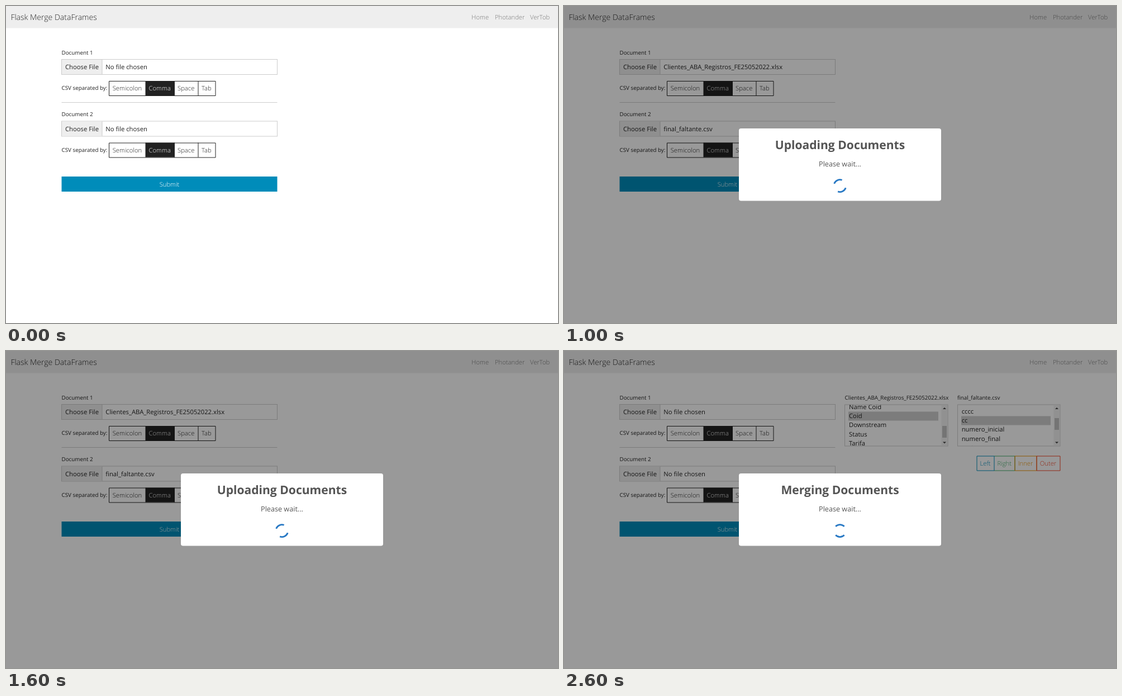
Animation, 988 px wide and 567 px high, one loop 3 s. Source, as an HTML page:

```html
<!DOCTYPE html>
<html lang="en">
<head>
<meta charset="utf-8">
<title>Flask Merge DataFrames</title>
<style>
  html, body { margin: 0; width: 100%; height: 100%; overflow: hidden; background: #fff; }
  svg { display: block; width: 988px; height: 567px; font: 400 11.25px "Open Sans", sans-serif; text-rendering: geometricPrecision; }
  text { fill: #222; }
  .light { font-weight: 300; }
  .label { font-size: 9.84px; }
  .brand { font-size: 14.06px; }
  .link { fill: #777; }
  .white { fill: #fff; }
  .mid { text-anchor: middle; }
  .title { font-size: 21.09px; font-weight: 700; fill: #545454; }
  .note { font-size: 12.656px; fill: #545454; }
  .field { fill: #fff; stroke: #ccc; }
  .box { fill: none; stroke: #222; }
  .spin { fill: none; stroke: #2778c4; stroke-width: 2.8; }

  /* idle -> uploading -> merging */
  .idle, .upload, .merge, .busy, .empty { animation: 3s step-end infinite; }
  .idle { animation-name: idle; }
  .upload { animation-name: upload; }
  .merge { animation-name: merge; }
  .busy { animation-name: busy; }
  .empty { animation-name: empty; }
  @keyframes upload { 0%, 66.6666%, 100% { visibility: hidden; } 33.3333% { visibility: visible; } }
  @keyframes merge { 0%, 33.3333% { visibility: hidden; } 66.6666%, 100% { visibility: visible; } }
  @keyframes busy { 0% { visibility: hidden; } 33.3333%, 100% { visibility: visible; } }
  @keyframes empty { 0%, 66.6666%, 100% { visibility: visible; } 33.3333% { visibility: hidden; } }
</style>
</head>
<body>
<svg viewBox="0 0 988 567">
  <defs>
    <g id="form">
      <rect class="field" x="99.5" y="95.5" width="386" height="27"/>
      <path d="M100 96h72v26h-72z" fill="#eee"/>
      <path d="M172 96v26" stroke="#ccc"/>
      <text x="106" y="113">Choose File</text>
      <text class="label" x="99.5" y="150">CSV separated by:</text>
      <path d="M250 134h52v26h-52z" fill="#222"/>
      <path class="box" d="M184.5 134.5h190.5v26h-190.5zM250 134v26M301.5 134v26M344 134v26"/>
      <g class="light">
        <text x="190.7" y="151">Semicolon</text>
        <text class="white" x="255.5" y="151">Comma</text>
        <text x="307" y="151">Space</text>
        <text x="350" y="151">Tab</text>
      </g>
    </g>
    <g id="bar">
      <path d="M0 0h11v73h-11z" fill="#f1f1f1"/>
      <path d="M2.5 7.5l3-3 3 3zM2.5 66l3 3 3-3z" fill="#444"/>
    </g>
    <path id="arcs" class="spin" d="M-7.76-7.76A10.975 10.975 0 0 1 7.76-7.76M7.76 7.76A10.975 10.975 0 0 1-7.76 7.76"/>
    <clipPath id="list1"><path d="M503 96.5h173v73h-173z"/></clipPath>
    <clipPath id="list2"><path d="M705 96.5h172v73h-172z"/></clipPath>
  </defs>

  <path d="M0 0h988v39.5h-988z" fill="#eee"/>
  <g class="light">
    <text class="brand" x="8.4" y="25">Flask Merge DataFrames</text>
    <text class="link" x="833.3" y="24">Home</text>
    <text class="link" x="875" y="24">Photander</text>
    <text class="link" x="938" y="24">VerTob</text>
  </g>

  <text class="label" x="99.5" y="86.5">Document 1</text>
  <use href="#form"/>
  <path d="M99.5 172.5h386" stroke="#ccc"/>
  <text class="label" x="99.5" y="197">Document 2</text>
  <use href="#form" y="110.5"/>
  <path d="M99.5 305h386v27h-386z" fill="#008cba"/>
  <text class="light white mid" x="292.5" y="322.5">Submit</text>

  <g class="empty">
    <text x="178.3" y="113">No file chosen</text>
    <text x="178.3" y="223.5">No file chosen</text>
  </g>
  <g class="upload">
    <text x="178.3" y="113">Clientes_ABA_Registros_FE25052022.xlsx</text>
    <text x="178.3" y="223.5">final_faltante.csv</text>
  </g>

  <g class="merge">
    <text class="label" x="502.5" y="86.5">Clientes_ABA_Registros_FE25052022.xlsx</text>
    <text class="label" x="704" y="86.5">final_faltante.csv</text>
    <rect class="field" x="502.5" y="96" width="184.5" height="74"/>
    <rect class="field" x="704.5" y="96" width="183.5" height="74"/>
    <path d="M509 108.5h161v16h-161zM711 116.5h160v16h-160z" fill="#cecece"/>
    <g clip-path="url(#list1)">
      <text x="510" y="104">Name Coid</text>
      <text x="510" y="120.2">Coid</text>
      <text x="510" y="136.4">Downstream</text>
      <text x="510" y="152.6">Status</text>
      <text x="510" y="168.8">Tarifa</text>
    </g>
    <g clip-path="url(#list2)">
      <text x="711.7" y="111.9">cccc</text>
      <text x="711.7" y="128.1">cc</text>
      <text x="711.7" y="144.3">numero_inicial</text>
      <text x="711.7" y="160.5">numero_final</text>
      <text x="711.7" y="176.7">sector</text>
    </g>
    <use href="#bar" x="675.5" y="96.5"/>
    <use href="#bar" x="876.5" y="96.5"/>
    <path d="M677 134h8v21h-8zM878 120h8v21h-8z" fill="#c1c1c1"/>
    <g fill="none">
      <path d="M770 188h37v26h-37" stroke="#43ac6a"/>
      <path d="M807 188h39v26h-39z" stroke="#e99002"/>
      <path d="M846 188h42v26h-42z" stroke="#f04124"/>
      <path d="M739 188h31v26h-31z" stroke="#008cba"/>
    </g>
    <g class="light">
      <text x="744.5" y="205" style="fill:#008cba">Left</text>
      <text x="775.5" y="205" style="fill:#43ac6a">Right</text>
      <text x="812.7" y="205" style="fill:#e99002">Inner</text>
      <text x="851.7" y="205" style="fill:#f04124">Outer</text>
    </g>
  </g>

  <g class="busy">
    <path d="M0 0h988v567h-988z" opacity=".4"/>
    <rect x="313" y="219" width="362" height="129.5" rx="3.75" fill="#fff"/>
    <text class="note mid" x="494" y="287">Please wait...</text>
  </g>
  <g class="upload">
    <text class="title mid" x="494" y="256">Uploading Documents</text>
    <use href="#arcs" transform="translate(493.9 321.6) rotate(-25)"/>
  </g>
  <g class="merge">
    <text class="title mid" x="494" y="256">Merging Documents</text>
    <use href="#arcs" transform="translate(493.9 321.6)"/>
  </g>
</svg>
</body>
</html>
```
